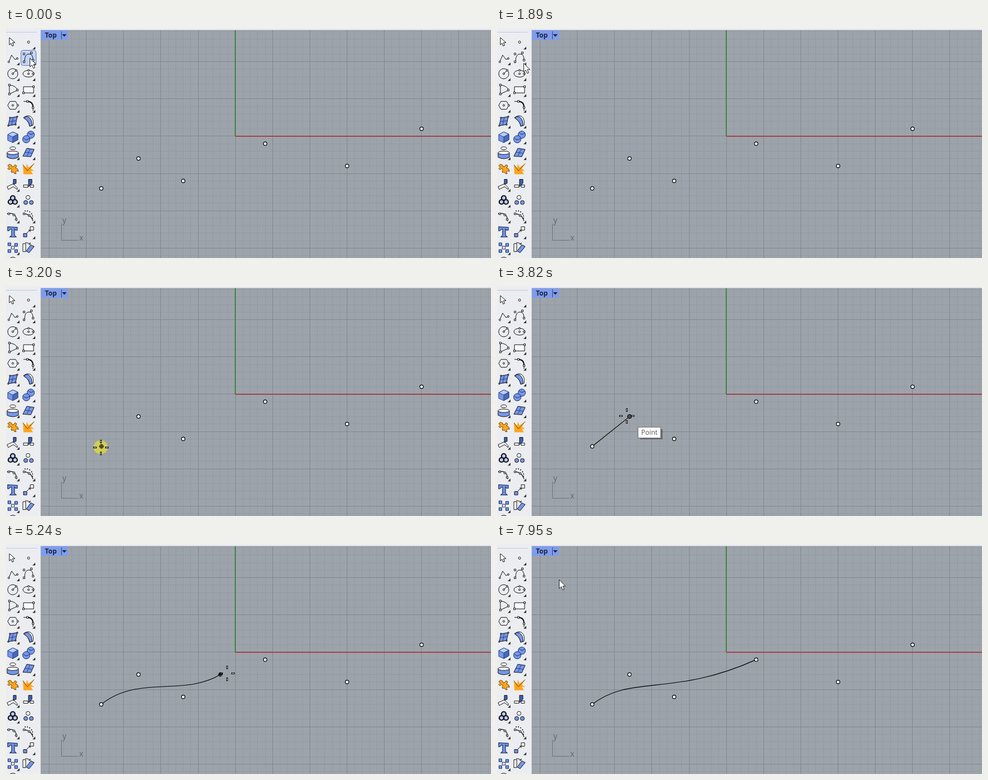
Animation, 861 px wide and 408 px high, one loop 8 s. Source, as an HTML page with a canvas:

```html
<!DOCTYPE html>
<html lang="en">
<head>
<meta charset="utf-8">
<title>Control point curve</title>
<style>
  html, body { margin: 0; width: 100%; height: 100%; overflow: hidden; background: #ebedf1; }
  canvas { display: block; }
</style>
</head>
<body>
<canvas id="stage" width="861" height="408"></canvas>
<script>
const W = 861, H = 408, LOOP = 8000;
const UNIT = 13.225, ORIGIN = { x: 407.15, y: 191.9 };
const FONT = '"Open Sans", "Noto Sans", sans-serif';
const INK = '#111', BLUE = '#7696ea', PALE = '#b9ccfa', ORANGE = '#ffa51f';

const world = (x, y) => ({ x: ORIGIN.x + x * UNIT, y: ORIGIN.y + y * UNIT });
const mix = (a, b, k) => ({ x: a.x + (b.x - a.x) * k, y: a.y + (b.y - a.y) * k });
const points = [[-18, 7], [-13, 3], [-7, 6], [4, 1], [15, 4], [25, -1]].map(p => world(...p));

const canvas = document.getElementById('stage');
const base = document.createElement('canvas');
base.width = W;
base.height = H;
let ctx = base.getContext('2d');

function shape(d, fill, stroke = INK, width = 1) {
  const path = new Path2D(d);
  if (fill) { ctx.fillStyle = fill; ctx.fill(path); }
  if (stroke) { ctx.strokeStyle = stroke; ctx.lineWidth = width; ctx.stroke(path); }
}
function text(str, x, y, size, color, weight = 400) {
  ctx.font = `${weight} ${size}px ${FONT}`;
  ctx.fillStyle = color;
  ctx.fillText(str, x, y);
}
function box(x, y, w, h, fill, stroke) {
  ctx.fillStyle = fill;
  ctx.fillRect(x, y, w, h);
  if (!stroke) return;
  ctx.strokeStyle = stroke;
  ctx.lineWidth = 1;
  ctx.strokeRect(x + .5, y + .5, w - 1, h - 1);
}
const disc = (x, y, r) => `M${x - r} ${y}a${r} ${r} 0 1 0 ${2 * r} 0a${r} ${r} 0 1 0 ${-2 * r} 0z`;
const oval = (x, y, a, b) => `M${x - a} ${y}a${a} ${b} 0 1 0 ${2 * a} 0a${a} ${b} 0 1 0 ${-2 * a} 0z`;
const square = (x, y, r = 1.5) => `M${x - r} ${y - r}h${2 * r}v${2 * r}h${-2 * r}z`;
const squares = (...list) => list.map(p => square(...p)).join('');

// Toolbar rows: left and right icon, each a list of [path, fill, stroke, width].
const icons = [
  [[['M-6-8V5L-3 2-1 7 1.5 6-.5 1H4Z', '#fff']],
   [[disc(0, 0, 2), '#fff']]],
  [[['M-7 7L-2-5 4 3 8 1'], [disc(-7, 7, 1.5) + disc(8, 1, 1.5), '#fff']],
   [['M-7 6Q-7-7 1-7 8-7 8 4'], [squares([-8, -7], [5, -9], [-8, 7], [8, 4]), '#fff']]],
  [[[disc(0, 0, 9)], ['M0 0L6-6'], [disc(0, 0, 1.5) + disc(6, -6, 1.5), '#fff']],
   [[oval(0, 0, 10, 6)], [disc(0, 0, 1.5) + disc(8, 0, 1.5) + disc(0, -6, 1.5), '#fff']]],
  [[['M-6 8V-8Q5-7 9 1L-6 8'], [squares([-6, -8], [-6, 8], [8, 1]), '#fff']],
   [['M-9-5H9V6H-9Z', '#f8f9fb'], [squares([-9, 6], [9, -5]), '#fff']]],
  [[['M-9 0L-5-7H5L9 0 5 7H-5Z'], [disc(0, 0, 1.5) + disc(9, 0, 1.5), '#fff']],
   [['M-9-7H-2M8 4V10'], ['M-2-7Q8-7 8 4', null, INK, 2], [squares([-2, -7], [8, 4]), '#fff']]],
  [[['M-5-6L8-8 5 6-8 8Z', BLUE], ['M1-7L-2 7M-7 1L7-1', null, '#28427f'],
    [squares([-5, -6, 1], [8, -8, 1], [5, 6, 1], [-8, 8, 1]), '#fff']],
   [['M-9-6Q-2-12 4-8 10-3 8 7L2 9Q1 0-9-6Z', '#fff'], ['M-9-6Q-4-9-1-8 7-4 6 8L2 9Q1 0-9-6Z', BLUE]]],
  [[['M-9-4L0-9 9-5V5L0 10-9 6Z', BLUE, '#2b4585'], ['M-9-4L0 0 9-5 0-9Z', PALE, '#2b4585'],
    ['M0 0L9-5V5L0 10Z', '#4969b8', '#2b4585']],
   [[disc(4, -4, 6.5), BLUE, '#1c2f63'], [disc(-4, 4, 6.5), BLUE, '#1c2f63'],
    ['M-9 2Q-4 8 2 2M-1-8Q4-2 9-7', null, '#1c2f63']]],
  [[[oval(0, -8, 5, 2.5), '#fff'], ['M-10 0V8Q0 13 10 8V0Q0 5-10 0Z', BLUE], [oval(0, 0, 10, 3), '#fff']],
   [['M-3-8L10-6 4 7-10 6Z', BLUE], ['M3-7L-3 6M-6-1L7 1', null, '#28427f']]],
  [[['M-9-5L-6-8-2-6-1-3 2-4 4-7 7-5 5-1 9 1 10 5 7 4 5 6 6 9 3 9 1 6-2 7-3 4-1 2-4 0-7 2-9 0-6-3Z',
    ORANGE, '#6d4300']],
   [['M-10-7L-4-1-3-9 0-2 10-9 4 0 10 4 4 4 8 10-9 10Z', ORANGE, null],
    ['M-10-7L-2 4 10-9', null, '#6d4300']]],
  [[['M-10 4L1-1 8 6V9L1 4-8 9Z', '#fff'], ['M1-9H6V-2L1 0Z', '#3f61b4']],
   [['M-9 1H-1V5H-9ZM3 1H9V5H3Z', '#fff'], ['M0-9H6V-2L0 4Z', '#3f61b4']]],
  [[[disc(0, -4, 4) + disc(-4, 3, 4) + disc(4, 3, 4), PALE, INK, 2.2]],
   [[disc(-1, -5, 3.5), '#fff'], [disc(-5, 4, 3.5), BLUE], [disc(5, 4, 3.5), BLUE]]],
  [[['M-10-4Q6-8 7 9', null, INK, 1.2], [squares([-7, -4], [2, -2], [6, 6]), '#fff']],
   [['M-9-4Q4-4 8 9', null, INK, 1.2], ['M-7-9h2m2 0h2m2 1l2 1m2 2l1 2m1 2v2m0 2v2', null, INK, 1.5],
    [squares([-8, -4], [1, -1]), '#fff']]],
  [[['M-9-9L8-8V-3H5L3-5V6L6 9H-5L-2 6V-5H-4L-7-2H-9Z', BLUE, '#203566', 1.3]],
   [[square(-6, 6, 3), BLUE], [square(6, -6, 3), '#fff'], ['M-3 2L3-3M0-3H3V0']]],
  [[[squares([-6, -6, 2.5], [6, -5, 2.5], [-6, 6, 2.5], [6, 6, 2.5]), BLUE, '#182a58'],
    [square(0, 0, 2.5), '#fff', '#182a58']],
   [['M-10-7H-5V7H-10Z', '#fff'], ['M4-5L10-2 1 9-4 6Z', BLUE], ['M-6-9Q0-9 3-6M0-6H3V-9']]]
];
const plain = new Set(['0,0', '8,0', '8,1', '9,1', '10,1', '12,0', '13,1']);

function drawIcon(row, col) {
  ctx.save();
  ctx.translate(12 + col * 28, 25 + row * 28.05);
  icons[row][col].forEach(part => shape(...part));
  if (!plain.has(`${row},${col}`)) shape('M12 8v5h-5z', '#333', null);
  ctx.restore();
}

function gridLines(every, color) {
  ctx.fillStyle = color;
  const gap = UNIT * every;
  for (let x = ORIGIN.x % gap; x < W; x += gap) if (x >= 62) ctx.fillRect(Math.floor(x), 4, 1, H);
  for (let y = ORIGIN.y % gap; y < H; y += gap) if (y >= 4) ctx.fillRect(62, Math.floor(y), W, 1);
}

function drawBase() {
  box(0, 0, W, H, '#ebedf1');
  box(0, 7, 55, 1, '#bccbe3');
  box(61, 3, W - 61, H - 3, '#c4c8cd');
  box(62, 4, W - 62, H - 4, '#9da3aa');
  gridLines(1, '#949ba2');
  gridLines(5, '#80888f');
  box(406, 4, 2, 188, '#3f8546');
  box(407, 191, W - 407, 2, '#a0454b');

  box(62, 4, 48, 17, '#7f9cec');
  text('Top', 69, 17, 12, '#17233f', 700);
  box(98, 6, 1, 14, '#35466f');
  shape('M99.5 11h8l-4 4.5z', '#17233f', null);

  shape('M98.5 347V376.5H128', null, '#70767c');
  text('y', 100, 346, 14, '#60666c');
  text('x', 130, 377, 14, '#60666c');

  icons.forEach((_, row) => [0, 1].forEach(col => {
    if (row !== 1 || col !== 1) drawIcon(row, col);
  }));
  shape('M6 409Q12 404 18 409', '#fff');
}

// Pointer steps; each one holds until the next.
const steps = [];
const smooth = k => k * k * (3 - 2 * k);
const linear = k => k;
const last = () => steps[steps.length - 1];
function step(t, x, y, extra = {}) {
  const before = last() || { x, y };
  steps.push({ t, x, y, lag: mix(before, { x, y }, .7), click: false, ...extra });
}
function glide(start, end, count, x, y, ease = smooth) {
  const from = last();
  for (let i = 1; i <= count; i++) {
    const p = mix(from, { x, y }, ease(i / count));
    step(start + (end - start) * (i - 1) / (count - 1), Math.round(p.x), Math.round(p.y));
  }
}
const click = t => step(t, last().x, last().y, { click: true });

step(0, 42, 53);
click(1290);
step(1390, 42, 53);
glide(1890, 2610, 8, 165, 265);
glide(2710, 2810, 2, 168, 286);
click(3110);
glide(3211, 3820, 7, 230, 230);
click(3920);
glide(4020, 4520, 6, 319, 268);
click(4920);
glide(5020, 5240, 3, 392, 229, linear);
glide(5340, 5540, 3, 450, 208, linear);
click(5750);
step(5840, 450, 208);
glide(7650, 7950, 4, 110, 63);

const placements = [3110, 3920, 4920, 5750];

function snap(s) {
  const hit = points.find(p => Math.hypot(p.x - s.x, p.y - s.y) < 12);
  if (hit) return { ...hit, onPoint: true };
  const round = axis => Math.round((s.lag[axis] - ORIGIN[axis]) / UNIT);
  return world(round('x'), round('y'));
}

// Clamped B-spline of up to five control points, as Bezier pieces.
function drawCurve(p) {
  if (p.length < 2) return;
  const at = q => [q.x, q.y];
  ctx.beginPath();
  ctx.moveTo(...at(p[0]));
  if (p.length === 2) ctx.lineTo(...at(p[1]));
  if (p.length === 3) ctx.quadraticCurveTo(...at(p[1]), ...at(p[2]));
  if (p.length === 4) ctx.bezierCurveTo(...at(p[1]), ...at(p[2]), ...at(p[3]));
  if (p.length === 5) {
    const a = mix(p[1], p[2], .5), b = mix(p[2], p[3], .5);
    ctx.bezierCurveTo(...at(p[1]), ...at(a), ...at(mix(a, b, .5)));
    ctx.bezierCurveTo(...at(b), ...at(p[3]), ...at(p[4]));
  }
  ctx.strokeStyle = '#000';
  ctx.lineWidth = 1.1;
  ctx.stroke();
}

function drawArrow(x, y) {
  ctx.save();
  ctx.translate(x + .5, y + .5);
  shape('M0 0V15.5L3.6 12.2 6.2 18 8.8 16.9 6.3 11.3H11Z', '#fff', '#222');
  ctx.restore();
}

function drawCrosshair({ x, y }) {
  for (const s of [-13, 8]) {
    box(x + s, y - 1, 6, 3, '#fff', '#000');
    box(x - 1, y + s, 3, 6, '#fff', '#000');
  }
}

function drawMarker({ x, y }) {
  ctx.save();
  ctx.translate(Math.floor(x) + .5, Math.floor(y) + .5);
  shape('M-2.5-2.5h5v5h-5zM-4 0H4M0-4V4', null, '#000');
  ctx.restore();
}

function drawPointTip({ x, y }) {
  box(x + 24, y + 24, 40, 18, 'rgba(60,64,70,.55)');
  box(x + 20, y + 20, 41, 20, '#fff', '#767676');
  text('Point', x + 26, y + 34, 12, '#575757');
}

function drawButtonTip() {
  box(26, 72, 140, 41, '#fff', '#000');
  [['Control Point Curve', 30], ['Curve through points', 34]].forEach(([label, key], i) => {
    const y = 77 + i * 16;
    ctx.beginPath();
    ctx.roundRect(29.5, y + .5, 9, 12, 2);
    ctx.strokeStyle = '#333';
    ctx.lineWidth = 1;
    ctx.stroke();
    box(key, y + 1, 4, 5, '#000');
    box(30, y + 6, 8, 1, '#999');
    text(label, 44, y + 11, 11.3, '#000');
  });
}

function draw(t) {
  const now = steps.filter(s => s.t <= t).pop();
  const done = t >= 6440;
  const crosshair = now.x > 62 && t < 6560;
  const placed = points.slice(0, placements.filter(at => at <= t).length);
  const target = snap(now);

  ctx.drawImage(base, 0, 0);
  if (t < 1890) {
    ctx.beginPath();
    ctx.roundRect(26.5, 39.5, 27, 27, 4);
    ctx.fillStyle = '#c3d4f6';
    ctx.strokeStyle = '#5d7cb8';
    ctx.lineWidth = 1;
    ctx.fill();
    ctx.stroke();
  }
  drawIcon(1, 1);

  drawCurve(crosshair && !done && placed.length ? [...placed, target] : placed);
  for (const p of points) shape(disc(p.x, p.y, 3.1), '#fff', '#000', 1.2);

  if (t >= 400 && t < 1890) drawButtonTip();
  if (done && t < 7650) text('[Enter]', 604.5, 375, 43.6, '#000');
  if (now.click) {
    const center = crosshair ? now : { x: 40, y: 53 };
    shape(disc(center.x, center.y, 12.5), 'rgba(224,220,60,.75)', null);
  }
  if (crosshair) {
    drawCrosshair(now);
    if (!done) drawMarker(target);
    if (target.onPoint && !now.click && t >= 2810 && t < 5750) drawPointTip(now);
  } else {
    drawArrow(now.x, now.y);
  }
}

drawBase();
ctx = canvas.getContext('2d');
const began = performance.now();
function tick() {
  draw((performance.now() - began) % LOOP);
  requestAnimationFrame(tick);
}
tick();
</script>
</body>
</html>
```
